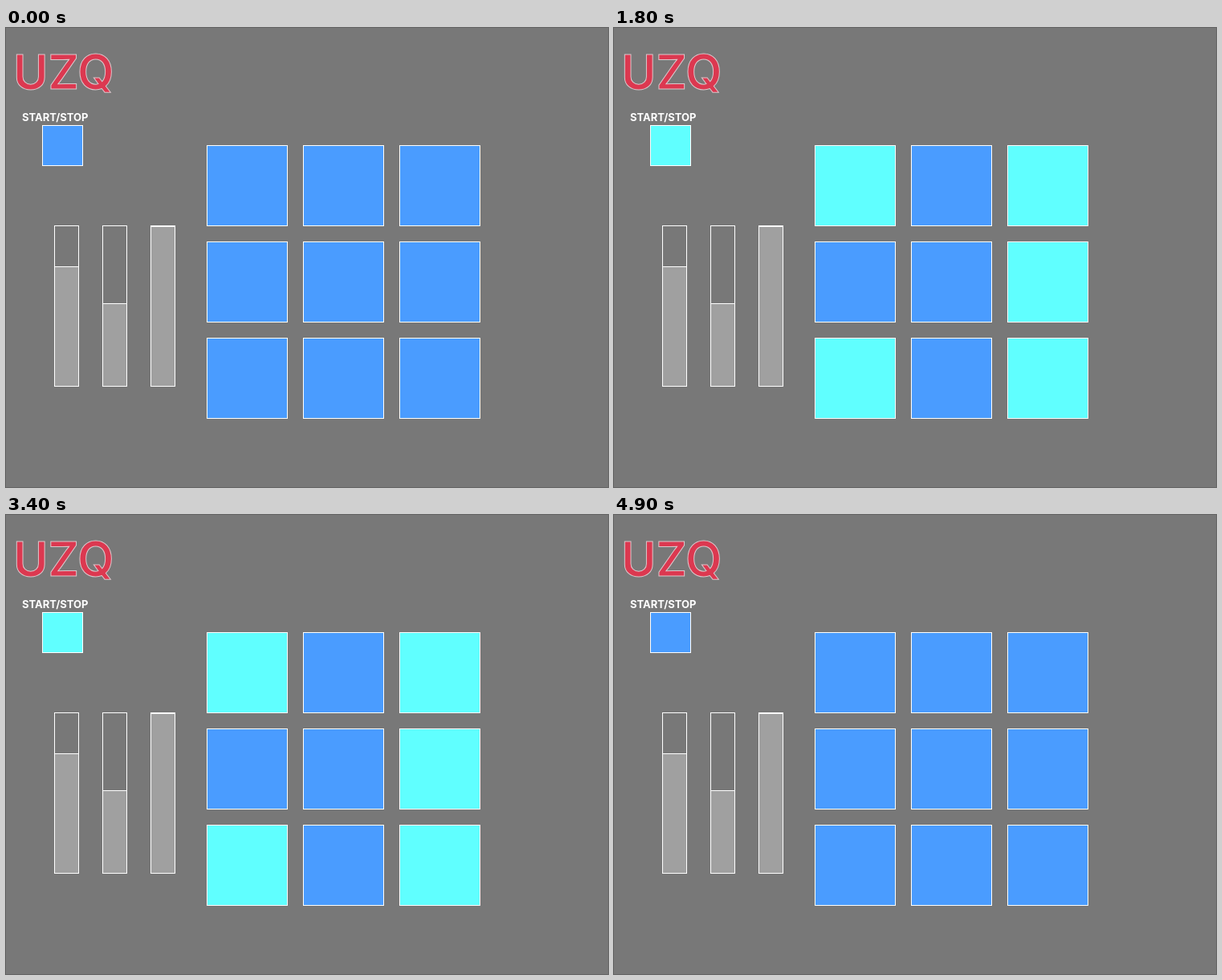
An HTML page for the animation above (5000 ms loop, 750x572 px).

```html
<!DOCTYPE html>
<html lang="en">
<head>
<meta charset="utf-8">
<title>Drum pads</title>
<style>
  html, body { margin: 0; width: 100%; height: 100%; overflow: hidden; background: #787878; }
  svg { display: block; }
  rect { stroke: #fff; fill: none; }
  .pad { fill: #4a9cff; }
  .lit .active { fill: #60ffff; }
  .level { fill: #a0a0a0; }
  text { font-family: Inter, Arial, sans-serif; }
  .title { font-size: 59px; font-weight: 600; fill: #dc3850; stroke: #dcc8cc; stroke-width: 1; }
  .label { font-size: 13px; font-weight: 700; fill: #fff; }
</style>
</head>
<body>
<svg id="stage" width="750" height="572" viewBox="0 0 750 572">
  <text class="title" x="9" y="76">UZQ</text>
  <text class="label" x="20" y="116">START/STOP</text>
</svg>
<script>
const stage = document.getElementById('stage');
const LOOP = 5000, START = 100, STOP = 4900;

function box(x, y, w, h, name) {
  const r = document.createElementNS('http://www.w3.org/2000/svg', 'rect');
  const attrs = { x: x + 0.5, y: y + 0.5, width: w, height: h, class: name };
  for (const key in attrs) r.setAttribute(key, attrs[key]);
  stage.append(r);
}

box(45, 121, 50, 50, 'pad active');

// Sliders: a frame with a filled level inside
[297, 343, 247].forEach((top, i) => {
  const x = 60 + i * 60;
  box(x, 246, 30, 200, 'slider');
  box(x, top, 30, 446 - top, 'level');
});

// Rows of the programmed pattern
['x.x', '..x', 'x.x'].forEach((row, j) => {
  [...row].forEach((cell, i) => {
    box(250 + i * 120, 146 + j * 120, 100, 100, cell === 'x' ? 'pad active' : 'pad');
  });
});

const begin = performance.now();
function draw() {
  const t = (performance.now() - begin) % LOOP;
  stage.classList.toggle('lit', t >= START && t < STOP);
  requestAnimationFrame(draw);
}
draw();
</script>
</body>
</html>
```
